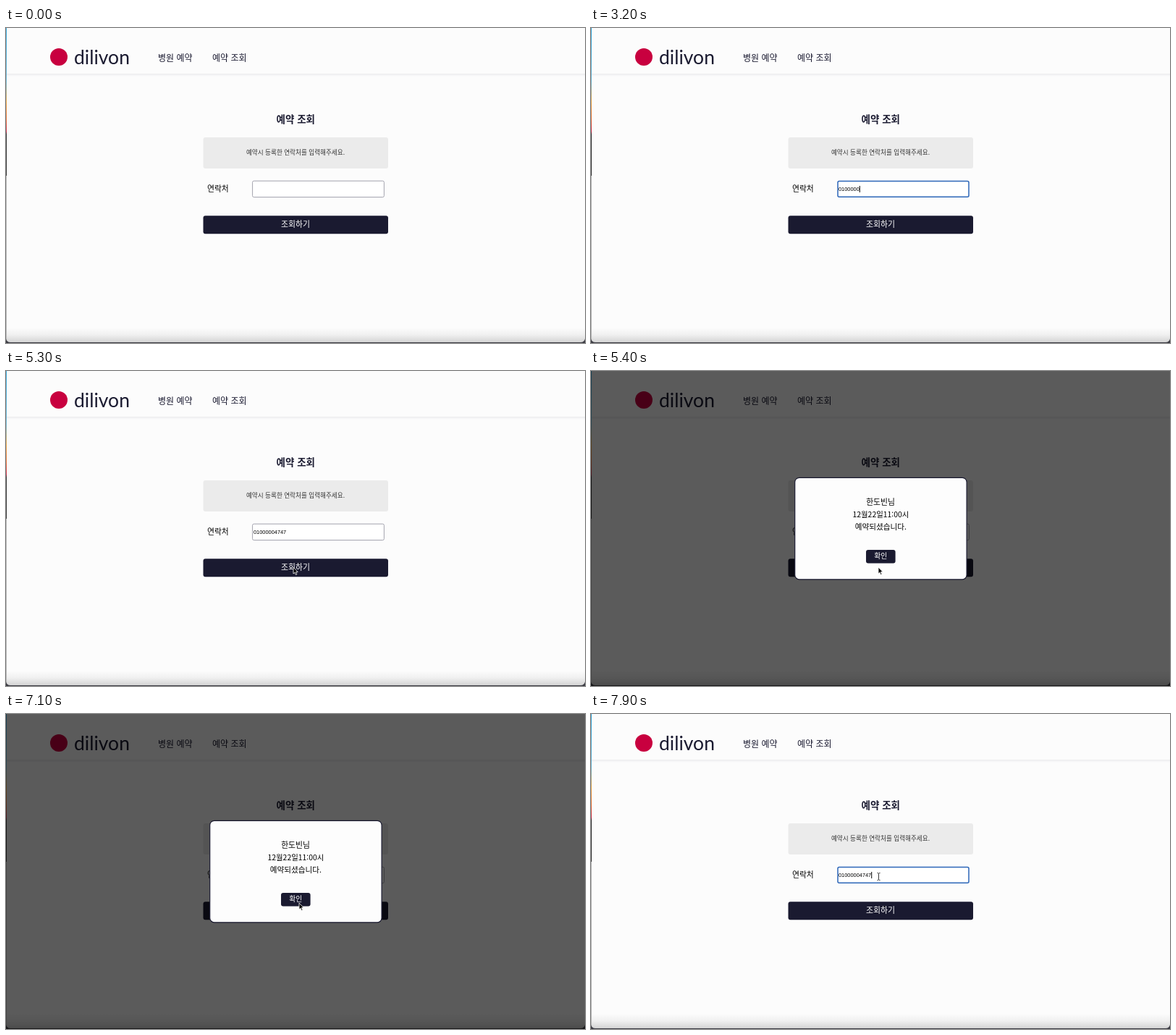
An HTML page for the animation above (8000 ms loop, 800 px wide and 435 px high).

```html
<!DOCTYPE html>
<html lang="ko">
<head>
<meta charset="utf-8">
<title>예약 조회</title>
<style>
  html, body { margin: 0; width: 100%; height: 100%; overflow: hidden; background: #fcfcfc; }
  svg { display: block; }
  text { font-family: "Noto Sans CJK KR", "Noto Sans CJK", "Noto Sans", sans-serif; fill: #1a1a30; }
  .mid { text-anchor: middle; }
  .medium { font-weight: 500; }
  .nav { font-size: 12px; }
  .label { font-size: 10.8px; }
  .brand { font: 26.5px Lato, sans-serif; }
  .digits { font: 7.4px "Liberation Sans", Arial, sans-serif; fill: #000; }
  .light { fill: #fff; }
  .black { fill: #000; }
</style>
</head>
<body>
<svg width="800" height="435" viewBox="0 0 800 435">
  <defs>
    <linearGradient id="desk" x2="0" y2="1">
      <stop offset="0" stop-color="#35a5d8"/>
      <stop offset=".36" stop-color="#6fb4cf"/>
      <stop offset=".5" stop-color="#e5a548"/>
      <stop offset=".62" stop-color="#e2703a"/>
      <stop offset=".7" stop-color="#c8304c"/>
      <stop offset=".72" stop-color="#333"/>
      <stop offset="1" stop-color="#333"/>
    </linearGradient>
    <linearGradient id="floor" x2="0" y2="1">
      <stop offset="0" stop-color="#000" stop-opacity="0"/>
      <stop offset=".5" stop-color="#000" stop-opacity=".05"/>
      <stop offset="1" stop-color="#000" stop-opacity=".16"/>
    </linearGradient>
    <linearGradient id="line" x2="0" y2="1">
      <stop offset="0" stop-color="#ececee"/>
      <stop offset="1" stop-color="#fcfcfc"/>
    </linearGradient>
  </defs>

  <rect width="800" height="435" fill="#fcfcfc"/>
  <rect y="63" width="800" height="4" fill="url(#line)"/>
  <rect y="414" width="800" height="20" fill="url(#floor)"/>

  <circle cx="73" cy="40" r="12" fill="#c8003f"/>
  <text class="brand" x="94" y="49.5">dilivon</text>
  <text class="nav" x="210" y="46.3">병원 예약</text>
  <text class="nav" x="285" y="46.3">예약 조회</text>

  <text class="mid" x="400.3" y="131" font-size="13.5" font-weight="700">예약 조회</text>
  <rect x="272.5" y="151" width="255.5" height="43" rx="3" fill="#ebebeb"/>
  <text class="mid" x="400" y="175.2" font-size="8.6" style="fill:#333">예약시 등록한 연락처를 입력해주세요.</text>
  <text class="label medium black" x="278" y="225.8">연락처</text>
  <rect id="field" rx="2" fill="#fff"/>
  <text id="phone" class="digits" x="342" y="225.2"></text>
  <rect id="caret" y="218" width="1" height="9"/>
  <rect x="272.5" y="259.3" width="255.5" height="24.9" rx="3" fill="#1a1a30"/>
  <text class="mid medium light" x="400" y="275" font-size="10.9">조회하기</text>

  <rect width="1" height="435" fill="#b5b5b5"/>
  <rect width="1" height="204" fill="url(#desk)"/>
  <path d="M0 429Q1 434 6 434H794Q799 434 800 429V435H0Z" fill="#3c3c44"/>

  <g id="modal">
    <rect width="800" height="435" fill="#000" fill-opacity=".64"/>
    <rect x="281.7" y="147.4" width="237.4" height="140.4" rx="6" fill="#fdfdfd" stroke="#1a1a30" stroke-width="1.2"/>
    <g class="mid">
      <text class="black" x="400" y="185" font-size="10.8">한도빈님</text>
      <text class="black" x="400.4" y="202" font-size="10.4">12월22일11:00시</text>
      <text class="black" x="400.4" y="219" font-size="10.6">예약되셨습니다.</text>
      <rect x="380" y="247" width="40.6" height="18.4" rx="3" fill="#1a1a30"/>
      <text class="medium light" x="400.2" y="259.2" font-size="9.8">확인</text>
    </g>
  </g>

  <path id="arrow" d="M0 0V9L2 7.2 3.4 10.4 4.9 9.8 3.5 6.6H6.2Z" stroke="#fff" stroke-width=".8"/>
  <path id="beam" d="M-2-5Q0-5 0-4Q0-5 2-5M0-4V4M-2 5Q0 5 0 4Q0 5 2 5" fill="none" stroke="#222" stroke-width=".9"/>
</svg>
<script>
const LOOP = 8000, STEP = 100;
const NUMBER = "01000004747";
const KEYS = [1500, 1800, 2100, 2600, 2800, 2900, 3100, 3600, 3800, 4000, 4200];
const FOCUS = [[400, 5300], [7800, LOOP]];
// Pointer stops: time, x, y
const PATH = [[4600, 397.5, 224.5], [5000, 397, 271], [6500, 397, 271],
              [6900, 405, 261], [7300, 405, 261], [7700, 397.5, 224.5]];

const $ = id => document.getElementById(id);
const show = (el, on) => el.setAttribute("visibility", on ? "visible" : "hidden");
const set = (el, attrs) => { for (const k in attrs) el.setAttribute(k, attrs[k]); };

function pointerAt(t) {
  const i = PATH.findIndex(p => p[0] > t);
  if (i < 0) return PATH.at(-1).slice(1);
  if (i === 0) return null;
  const [t0, x0, y0] = PATH[i - 1], [t1, x1, y1] = PATH[i];
  const u = (t - t0) / (t1 - t0), e = u * u * (3 - 2 * u);
  return [x0 + (x1 - x0) * e, y0 + (y1 - y0) * e];
}

function drawField(t) {
  const focus = FOCUS.find(([a, b]) => t >= a && t < b);
  set($("field"), focus
    ? { x: 341, y: 211.4, width: 181, height: 21.8, stroke: "#2c66b8", "stroke-width": 1.5 }
    : { x: 340.6, y: 211.2, width: 181.8, height: 22.4, stroke: "#a3a3ae", "stroke-width": 1 });

  const typed = KEYS.filter(k => k <= t);
  const phone = $("phone");
  phone.textContent = NUMBER.slice(0, typed.length);
  const since = focus ? t - Math.max(focus[0], ...typed) : 0;
  set($("caret"), { x: 342 + phone.getComputedTextLength() });
  show($("caret"), focus && since % 1000 < 500);
}

function drawPointer(t) {
  const at = pointerAt(t);
  const overField = at && at[1] < 234;
  show($("arrow"), at && !overField);
  show($("beam"), overField);
  if (at) for (const id of ["arrow", "beam"]) set($(id), { transform: `translate(${at})` });
}

function draw(now) {
  const t = Math.floor(now % LOOP / STEP) * STEP;
  drawField(t);
  drawPointer(t);
  show($("modal"), t >= 5400 && t < 7200);
  requestAnimationFrame(draw);
}
draw(0);
</script>
</body>
</html>
```
